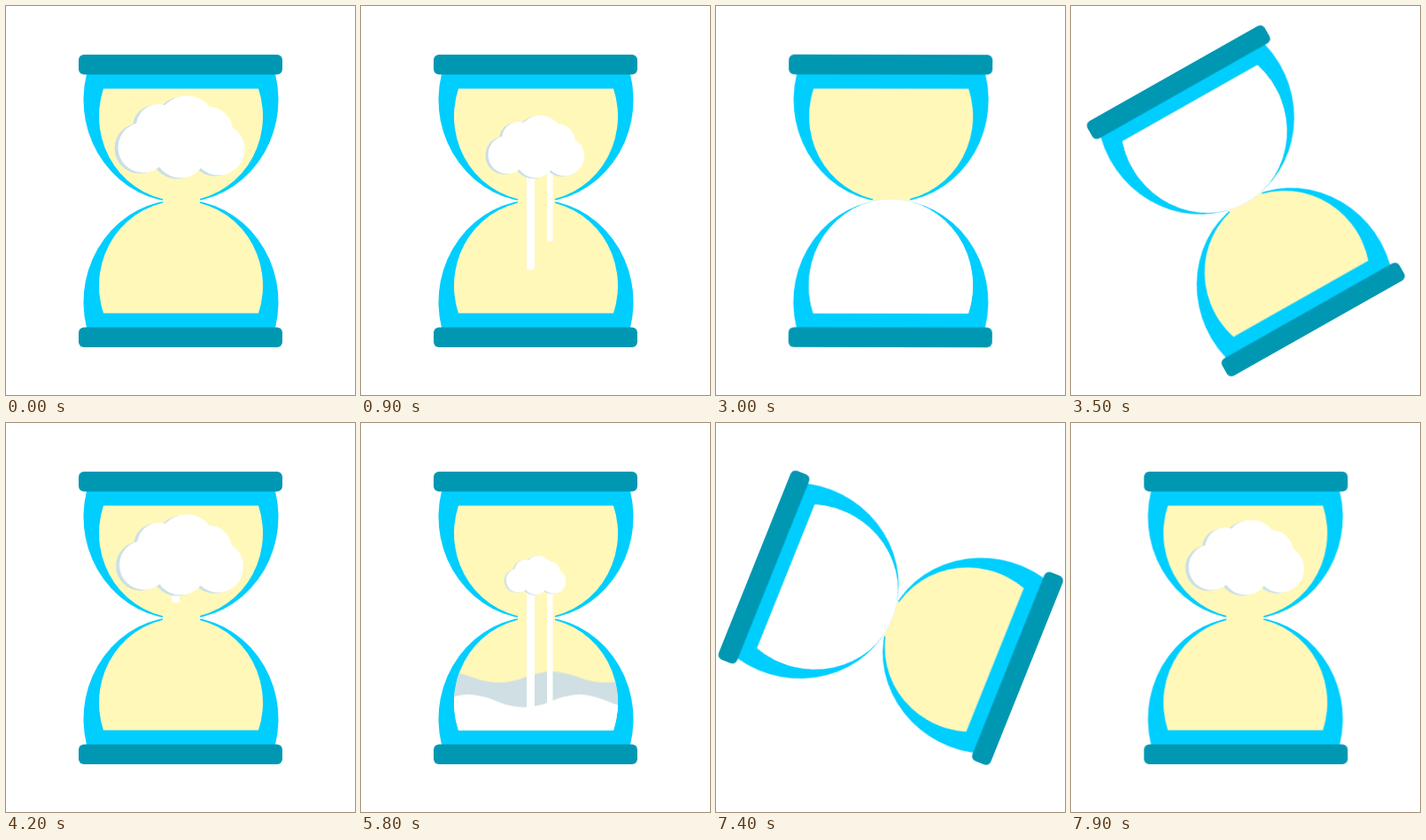
Write an HTML page that moves like this. It is 394 by 440 pixels and loops after 8010 ms.

```html
<!DOCTYPE html>
<html lang="en">
<head>
<meta charset="utf-8">
<title>Cloud hourglass</title>
<style>
  html, body { margin: 0; width: 100%; height: 100%; overflow: hidden; background: #fff; }
  svg { display: block; width: 100%; height: 100%; }

  .glass, .cloud, .drip, .wave, .fill {
    animation: 4005ms linear infinite both;
  }
  .glass { transform-origin: 197.2px 220.5px; animation-name: turn; }
  .cloud { transform-origin: 197px 194px; animation-name: cloud; }
  .drip { transform-origin: 0 185px; animation-name: drip; }
  .drip.late { animation-name: late; }
  .fill { animation-name: empty; }
  .back { animation-name: back; }
  .front { animation-name: front; }

  @keyframes turn {
    0%, 74.66% { transform: rotate(0deg); animation-timing-function: ease-in-out; }
    92.4%, 100% { transform: rotate(180deg); }
  }
  @keyframes cloud {
    0%, 2.5% { transform: scale(1); }
    4.87% { transform: scale(.98); }
    43.7% { transform: scale(.495); }
    68.7% { transform: scale(0); }
    92.4% { transform: scale(0); animation-timing-function: ease; }
    100% { transform: scale(1); }
  }
  @keyframes drip {
    0% { transform: scaleY(0); }
    2.5% { transform: scaleY(.05); }
    4.87% { transform: scaleY(.11); animation-timing-function: ease-in; }
    27.5%, 66.2% { transform: scaleY(1); opacity: 1; }
    71.2% { transform: translateY(40px) scaleY(.75); opacity: 1; }
    71.3%, 100% { transform: translateY(40px) scaleY(.75); opacity: 0; }
  }
  @keyframes late {
    0%, 8% { transform: scaleY(0); animation-timing-function: ease-in; }
    30%, 66.2% { transform: scaleY(1); opacity: 1; }
    71.2% { transform: translateY(40px) scaleY(.75); opacity: 1; }
    71.3%, 100% { transform: translateY(40px) scaleY(.75); opacity: 0; }
  }
  @keyframes back {
    0%, 28.7% { transform: translate(55px, 62px); }
    71.2%, 100% { transform: translate(-115px, -129px); }
  }
  @keyframes front {
    0%, 28.7% { transform: translate(22px, 62px); }
    71.2%, 100% { transform: translate(-46px, -129px); }
  }
  @keyframes empty {
    0%, 89.9% { opacity: 1; }
    93.6%, 100% { opacity: 0; }
  }
</style>
</head>
<body>
<svg viewBox="0 0 394 440" preserveAspectRatio="none">
  <defs>
    <path id="inner" d="M110 93.5H285A92.5 96 0 1 1 110 93.5Z"/>
    <g id="bulb">
      <path fill="#00ceff" d="M91 77H304A110 116 0 1 1 91 77Z"/>
      <rect fill="#0097b2" x="82" y="55" width="230" height="22.5" rx="6"/>
    </g>
    <g id="puff">
      <circle cx="155" cy="160" r="28.5"/>
      <circle cx="172" cy="136" r="25"/>
      <circle cx="204" cy="135" r="33.5"/>
      <circle cx="229" cy="141" r="27"/>
      <circle cx="240" cy="162" r="29.5"/>
      <circle cx="197" cy="165" r="29.5"/>
    </g>
    <clipPath id="lower">
      <use href="#inner" transform="translate(0 442.4) scale(1 -1.015)"/>
    </clipPath>
  </defs>

  <g class="glass">
    <use href="#bulb"/>
    <use href="#bulb" transform="translate(0 441) scale(1 -1)"/>
    <g fill="#fff8b9">
      <use href="#inner"/>
      <use href="#inner" transform="translate(0 441) scale(1 -1)"/>
      <rect x="177" y="217.5" width="42" height="6"/>
    </g>
    <g clip-path="url(#lower)">
      <g class="fill">
        <path class="wave back" fill="#cfdfe3"
          d="M-45 298q30-12 60 0t60 0 60 0 60 0 60 0 60 0 60 0 60 0 60 0 60 0V720H-45Z"/>
      </g>
    </g>
  </g>

  <g fill="#fff">
    <rect class="drip" x="187" y="185" width="9" height="162"/>
    <rect class="drip late" x="210" y="185" width="6.5" height="162"/>
  </g>

  <g class="glass">
    <g clip-path="url(#lower)">
      <g class="fill">
        <path class="wave front" fill="#fff"
          d="M-31 325q31.25-14 62.5 0t62.5 0 62.5 0 62.5 0 62.5 0 62.5 0 62.5 0 62.5 0V720H-31Z"/>
      </g>
    </g>
  </g>

  <g class="cloud">
    <use href="#puff" fill="#c9dfe8" transform="translate(-4 1)"/>
    <use href="#puff" fill="#fff"/>
  </g>
</svg>
</body>
</html>
```
